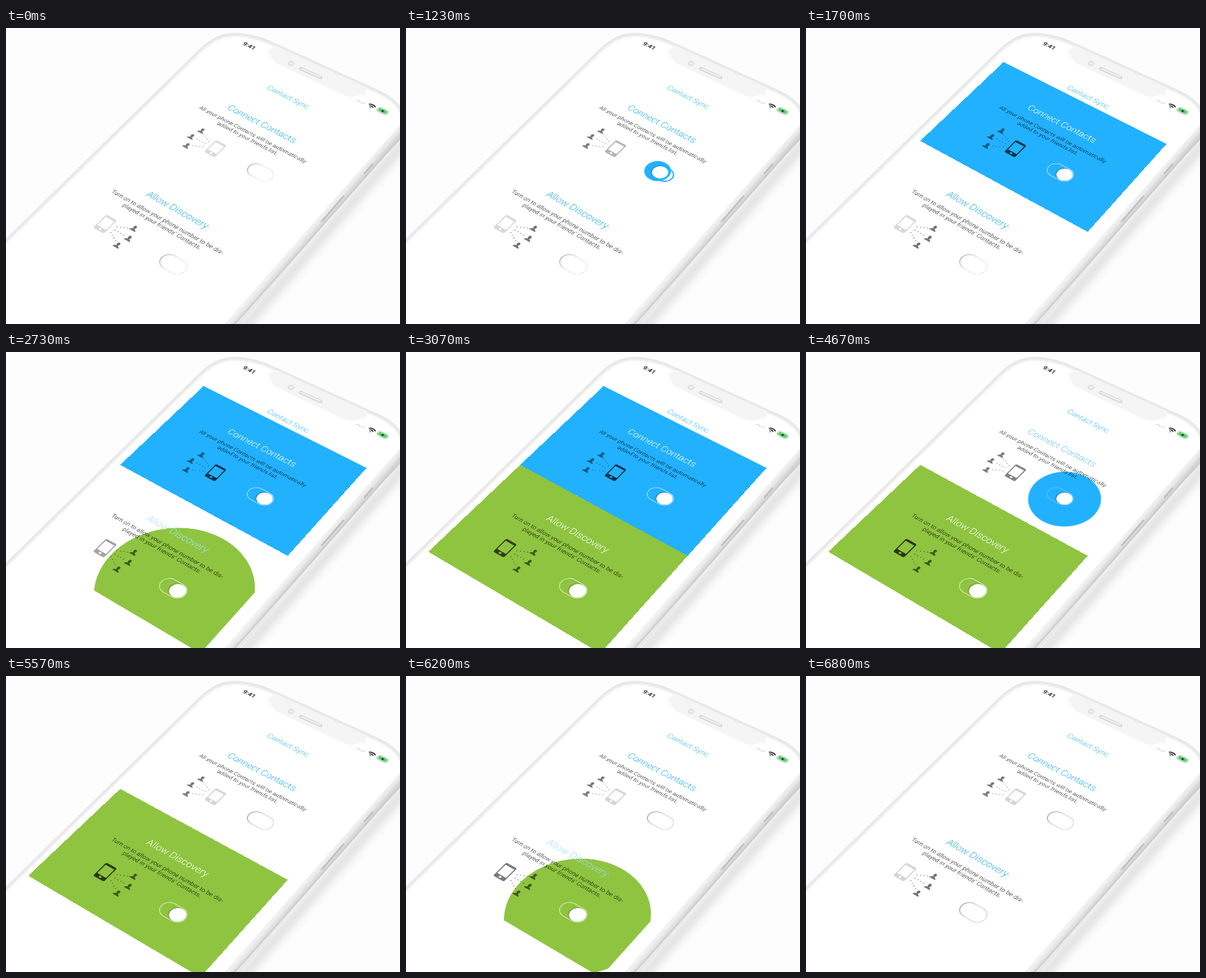
Write an HTML page that moves like this. It is 600 px wide and 452 px high and loops after 6.93 s.

```html
<!DOCTYPE html>
<html lang="en">
<head>
<meta charset="utf-8">
<title>Contact Sync</title>
<style>
  html, body { margin: 0; width: 100%; height: 100%; overflow: hidden; background: #fdfdfd; }
  #stage { position: relative; width: 600px; height: 452px; overflow: hidden; }
  #stage svg { position: absolute; left: 0; top: 0; overflow: visible; }
  /* Lays the flat 280 x 378 screen onto the tilted phone. */
  #screen {
    position: absolute; left: 0; top: 0; width: 280px; height: 378px;
    transform-origin: 0 0;
    transform: matrix3d(.7873, .4147, 0, -.00017926, -.71552, .58709, 0, -.00026959, 0, 0, 1, 0, 301, 52, 0, 1);
  }
  text { font-family: Roboto, "Liberation Sans", sans-serif; font-weight: 300; text-anchor: middle; text-rendering: geometricPrecision; }
  .head { font-size: 12.1px; fill: #2db3e8; }
  .title { font-size: 14.5px; fill: #2db3e8; }
  .body { font-size: 9.05px; font-weight: 400; fill: #000; fill-opacity: .62; }
  .clock { font-size: 10.5px; font-weight: 500; fill: #111; }
  .people { fill-opacity: .55; }
  .phone { opacity: .15; }
  .ring { fill: none; stroke: #e4e4e4; stroke-width: .9; }
  .knob { fill: #fff; filter: drop-shadow(-.4px .8px .9px rgba(0, 0, 0, .35)); }
</style>
</head>
<body>
<div id="stage">
  <svg width="600" height="452" viewBox="0 0 600 452">
    <defs>
      <linearGradient id="side" gradientUnits="userSpaceOnUse" x1="452" y1="312" x2="467" y2="325">
        <stop offset="0" stop-color="#fafafa"/>
        <stop offset=".45" stop-color="#e9e9e9"/>
        <stop offset=".8" stop-color="#cfcfcf"/>
        <stop offset="1" stop-color="#dedede"/>
      </linearGradient>
      <filter id="soft" x="-20%" y="-20%" width="140%" height="140%"><feGaussianBlur stdDeviation="7"/></filter>
      <filter id="haze" x="-20%" y="-20%" width="140%" height="140%"><feGaussianBlur stdDeviation="1.6"/></filter>
      <path id="case" d="M-10 332L280 47C308 18 326 4 362 9C376 11 388 14 402 20L560 92C584 102 600 114 607 134L607 155L340 470L-10 470Z"/>
      <clipPath id="inside"><use href="#case"/></clipPath>
    </defs>
    <path d="M620 160L350 470" stroke="#000" stroke-opacity=".13" stroke-width="14" filter="url(#soft)"/>
    <use href="#case" fill="#fff"/>
    <g clip-path="url(#inside)" fill="none">
      <use href="#case" stroke="#e8e8e8" stroke-width="9" filter="url(#haze)"/>
    </g>
    <use href="#case" fill="none" stroke="#e6e6e6" stroke-width="1"/>
    <path d="M612 128C604 146 592 158 580 171L325 462L340 462L512 268L572 200C588 182 604 168 612 152Z" fill="url(#side)"/>
    <path d="M612 128C604 146 592 158 580 171L325 462" fill="none" stroke="#ececec"/>
    <path d="M612 152C604 168 588 182 572 200L512 268L340 462" fill="none" stroke="#c9c9c9" stroke-width="1.5"/>
    <path d="M558 208L546 222M514 257L481 295" stroke="#bdbdbd" stroke-width="2.4" stroke-linecap="round"/>
    <path d="M398 36C405 41 403 51 418 57L518 104C529 109 534 98 546 104L550 91L410 27Z" fill="#f5f5f5"/>
    <path d="M449 62L479 75.5" stroke="#cfcfcf" stroke-width="5" stroke-linecap="round"/>
    <path d="M449.5 62L478.500 75" stroke="#efefef" stroke-width="3" stroke-linecap="round"/>
    <ellipse cx="434" cy="54" rx="4.200" ry="3" fill="#eee" stroke="#cfcfcf"/>
  </svg>

  <div id="screen">
    <svg width="280" height="378" viewBox="0 0 280 378">
      <defs>
        <clipPath id="upper"><rect width="280" height="190"/></clipPath>
        <clipPath id="lower"><rect y="190" width="280" height="188"/></clipPath>
        <g id="person">
          <ellipse cy="-2.200" rx="2.200" ry="2.700"/>
          <path d="M-4.700 4.300C-4.700 1.500-2 1.800-1 .2H1C2 1.800 4.700 1.500 4.700 4.300Z"/>
        </g>
        <g id="crowd">
          <use href="#person" x="80" y="110.500"/>
          <use href="#person" x="75" y="127.500"/>
          <use href="#person" x="80" y="144.500"/>
          <path d="M87 115L101 121.500M84 127H101M87 140L101 133" stroke="#000" stroke-opacity=".5"
            stroke-width="1.500" stroke-linecap="round" stroke-dasharray="0 4.800"/>
        </g>
        <path id="handset" fill-rule="evenodd" d="M109 113h13q2.500 0 2.500 2.500v22q0 2.500-2.500 2.500h-13q-2.500 0-2.500-2.500v-22q0-2.500 2.500-2.500ZM108.200 116.500v17h14.600v-17ZM113.500 136.500a2 1.500 0 1 0 4 0a2 1.500 0 1 0-4 0Z"/>
      </defs>

      <text class="clock" x="34" y="-62.300">9:41</text>
      <g fill="#888">
        <circle cx="224.500" cy="-63" r=".8"/><circle cx="228" cy="-63" r=".8"/>
        <circle cx="231.500" cy="-63" r=".8"/><circle cx="235" cy="-63" r=".8"/>
      </g>
      <g transform="translate(247 -62)" fill="none" stroke="#111" stroke-width="1.700">
        <path d="M-5.500-4.200A8 8 0 0 1 5.500-4.200M-3.200-1.700A4.800 4.800 0 0 1 3.200-1.700"/>
        <circle cy=".6" r=".9" fill="#111" stroke="none"/>
      </g>
      <g transform="translate(265 -66)">
        <rect x="-8.500" y="-4.500" width="16" height="9" rx="2.300" fill="#fff" stroke="#aaa" stroke-width=".8"/>
        <rect x="-7.300" y="-3.300" width="13.600" height="6.600" rx="1.300" fill="#55d468"/>
        <path d="M8.600-1.500q1.700 1.500 0 3Z" fill="#999"/>
        <path d="M.8-3.500L-3 .5H-.4L-1.600 3.500L2.200-.6H-.3Z" fill="#111"/>
      </g>
      <text class="head" x="140.500" y="-8">Contact Sync</text>
      <g id="panels"></g>
    </svg>
  </div>
</div>

<script>
const LOOP = 6930;
const panels = [
  { clip: 'upper', color: '#22b1ff', shift: 0, on: 870, off: 4400, icons: '',
    title: 'Connect Contacts',
    lines: ['All your phone Contacts will be automatically', 'added to your friends list.'] },
  { clip: 'lower', color: '#8fc440', shift: 191, on: 2300, off: 5970, icons: 'translate(193 189.5) scale(-1 1)',
    title: 'Allow Discovery',
    lines: ['Turn on to allow your phone number to be dis-', 'played in your friends’ Contacts.'] }
];

const markup = p => `<g>
  <g clip-path="url(#${p.clip})"><circle class="disc" cx="184" cy="${126.5 + p.shift}" r="0" fill="${p.color}"/></g>
  <g transform="${p.icons}">
    <use class="people" href="#crowd"/>
    <use class="phone" href="#handset"/>
  </g>
  <g transform="translate(0 ${p.shift})">
    <text class="title" x="140" y="56.300">${p.title}</text>
    <text class="body" x="140.500" y="78.500">${p.lines[0]}</text>
    <text class="body" x="140" y="88.300">${p.lines[1]}</text>
    <rect class="ring" x="172" y="114.500" width="38" height="24" rx="12"/>
    <circle class="knob" cx="184" cy="126.500" r="11"/>
  </g>
</g>`;

// Keys are [ms, value, easing towards the next key].
function track(el, prop, keys) {
  const all = [[0, keys[0][1]], ...keys, [LOOP, keys[keys.length - 1][1]]];
  el.animate(all.map(([ms, value, easing = 'linear']) => ({ offset: ms / LOOP, [prop]: value, easing })),
    { duration: LOOP, iterations: Infinity });
}

const root = document.getElementById('panels');
root.innerHTML = panels.map(markup).join('');

panels.forEach(({ on, off, color }, i) => {
  const find = name => root.children[i].querySelector('.' + name);
  const blue = '#2db3e8', white = '#ffffff';

  track(find('disc'), 'r', [
    [on + 150, '0px'], [on + 358, '14px', 'ease-out'], [on + 640, '240px'],
    [off, '240px', 'ease-in'], [off + 300, '14px'], [off + 440, '0px']]);
  track(find('disc'), 'cx', [
    [on + 335, '184px'], [on + 480, '198px'], [off + 290, '198px'], [off + 440, '184px']]);
  track(find('knob'), 'transform', [
    [on + 300, 'translate(0px)'], [on + 430, 'translate(14px)'],
    [off + 300, 'translate(14px)', 'ease-in-out'], [off + 480, 'translate(0px)']]);
  track(find('ring'), 'stroke', [
    [on, '#e4e4e4'], [on + 280, color], [on + 370, color], [on + 430, '#ffffffb8'],
    [off + 240, '#ffffffb8'], [off + 300, color], [off + 560, '#cacaca']]);
  track(find('ring'), 'strokeWidth', [
    [on, '.9px'], [on + 280, '1.8px'], [on + 370, '1.8px'], [on + 430, '.9px']]);
  track(find('title'), 'fill', [
    [on + 360, blue], [on + 480, white], [off + 160, white], [off + 320, blue]]);
  track(find('phone'), 'opacity', [
    [on + 200, .15], [on + 830, .72], [off, .72], [off + 650, .17]]);
});
</script>
</body>
</html>
```
